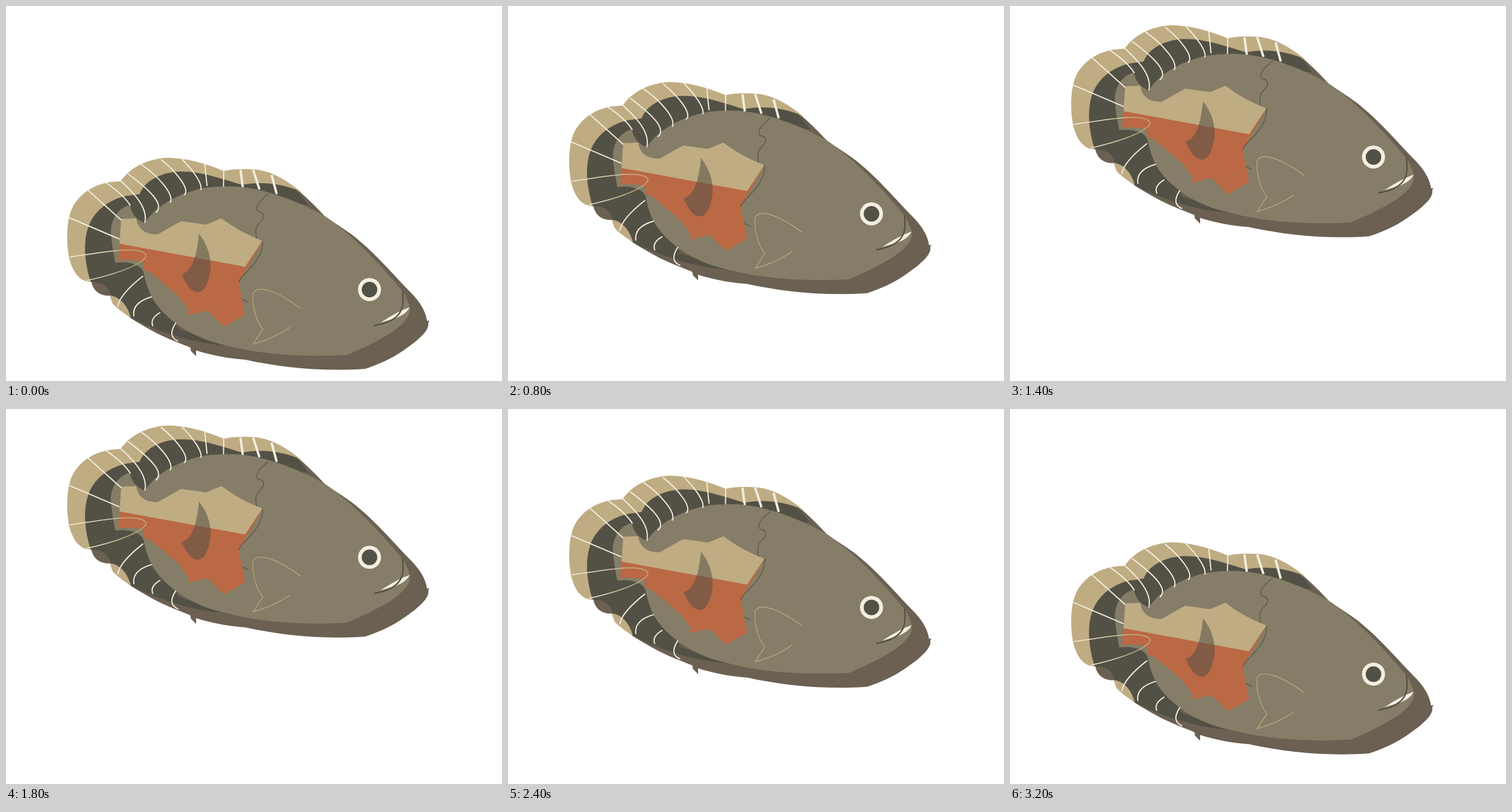
Animation, 861 px wide and 650 px high, one loop 3400 ms. Source, as an HTML page with a canvas:

```html
<!DOCTYPE html>
<html lang="en">
<head>
<meta charset="utf-8">
<title>Fish</title>
<style>
  html, body { margin: 0; width: 100%; height: 100%; overflow: hidden; background: #fff; }
  canvas { display: block; }
</style>
</head>
<body>
<canvas id="stage" width="861" height="650"></canvas>
<script>
const ctx = document.getElementById('stage').getContext('2d');

const BROWN = '#6b6052', TAN = '#bfac82', DARK = '#535145';
const OLIVE = '#857d67', RUST = '#bb6844', CREAM = '#f3eee0';
const LOOP = 3400, STEP = 200;

// Tail ray loop fades from cream to tan as it crosses the body
const rayFade = ctx.createLinearGradient(110, 0, 244, 0);
rayFade.addColorStop(0, CREAM);
rayFade.addColorStop(0.45, '#e6dabb');
rayFade.addColorStop(0.75, TAN);

const layers = [];
const fill = (color, d, alpha = 1) => layers.push({ path: new Path2D(d), color, alpha });
const line = (color, width, d) => layers.push({ path: new Path2D(d), color, width, alpha: 1 });

function disc(color, x, y, r) {
  const path = new Path2D();
  path.arc(x, y, r, 0, Math.PI * 2);
  layers.push({ path, color, alpha: 1 });
}

// Underside and back shadow
fill(BROWN, `M480 300 C510 318 535 345 553 364 C570 376 586 386 600 396
  C640 427 665 458 700 494 C718 512 728 527 731 546 L735 545 L733 549
  C736 562 715 580 690 597 C670 611 645 622 623 629 C550 634 480 627 415 613
  C385 611 355 605 330 597 L330 607 L321 598 L320 592 L290 580
  C265 570 240 556 215 540 L180 502 C160 503 150 490 148 477 L200 420 L300 400Z`);

// Fins
fill(TAN, `M199 304 C155 304 128 325 115 350 C103 375 105 420 111 442
  C118 465 130 479 149 478 L250 400 L480 320 L512 322
  C485 300 455 283 425 283 C405 282 390 283 378 286
  C345 272 310 263 280 263 C245 265 215 280 199 304Z`);
fill(TAN, 'M180 502 C200 500 214 520 217 541 C205 533 190 522 185 516Z');
fill(DARK, `M147 478 C135 440 134 405 144 380 C155 353 180 335 210 329 L232 326
  C240 305 265 289 300 287 C340 286 375 300 410 310 C440 304 475 307 505 319
  L525 345 L412 330 L250 400 L239 465 L300 560 L382 588
  C320 585 260 562 217 541 C212 522 200 505 182 502 C178 488 168 478 153 479Z`);

// Body
fill(OLIVE, `M241 376 C258 350 290 328 340 316 C365 312 390 312 412 314
  C465 321 515 343 553 364 C600 396 645 442 688 494 C697 507 701 520 701 529
  C697 555 650 580 592 605 C515 609 440 604 382 588 C325 577 275 543 253 505
  C246 490 242 478 239 462 C235 449 215 442 190 445 C186 428 182 400 182 388
  C184 366 196 350 215 345 C218 362 228 371 241 376Z`);

// Side patch
fill(RUST, `M197 412 L195 441 L213 440 Q230 440 240 446 L238 457 L250 461 L300 503
  L318 528 L314 536 L350 528 L378 556 L415 535 L404 479 L445 408 L445 406 L400 430Z`);
fill(TAN, `M200 369 L226 368 Q230 396 263 396 L304 373 L347 379 L374 368
  Q405 392 445 407 L415 452 L197 412Z`);
fill(DARK, `M335 395 C349 412 357 435 355 457 C352 478 345 496 333 496
  C320 495 312 481 305 465 C326 459 332 425 335 395Z`, 0.55);

// Fin rays
for (const d of [
  'M142 319 L200 371',
  'M173 306 Q204 327 216 346',
  'M110 367 L197 404',
  'M198 302 C223 325 247 350 241 376',
  'M212 291 C247 317 277 344 260 358',
  'M234 274 C263 294 293 326 285 341',
  'M269 266 C295 287 321 318 309 328',
  'M305 265 C324 284 342 308 338 319',
  'M345 274 L349 312',
  'M378 286 L377.5 313',
  'M238 468 Q197 500 194 521',
  'M253 504 Q218 514 222 538',
  'M268 531 Q249 542 255 555',
  'M295 549 Q279 573 299 581'
]) line(CREAM, 2, d);
for (const d of ['M407 284 L411 314', 'M429 284 L440 318', 'M461 293 L470 326']) line(CREAM, 4, d);
line(rayFade, 1.6, 'M111 435 C160 428 204 420 228 424 C244 427 247 433 238 440 C220 455 180 467 140 476');

// Gill lines
line(DARK, 1.2, `M456 325 C441 336 430 350 438 356 C451 358 449 368 441 375
  C432 383 433 393 435 403`);
line(DARK, 1.2, 'M445 407 C448 431 427 452 414 465 Q407 471 404 479');
line(DARK, 1.2, 'M410 508 L420 513');
line(TAN, 1.2, `M511 524 C475 497 437 481 429 498 C426 521 436 549 446 560
  L429 586 Q466 576 493 557`);

// Mouth and eye
fill(CREAM, 'M650 549 Q678 530 701 522 Q695 534 677 541 Z');
line(DARK, 2.4, 'M688 494 C693 525 686 546 639 554');
disc(CREAM, 631, 491.5, 20);
disc(DARK, 631, 491.5, 13.5);

// Rises for nine poses, then sinks a little more slowly
function lift(time) {
  const pose = Math.floor((time % LOOP) / STEP);
  return pose < 9 ? -32.83 * pose : -234.4 + 28.93 * (pose - 9);
}

function draw(time) {
  ctx.setTransform(1, 0, 0, 1, 0, 0);
  ctx.fillStyle = '#fff';
  ctx.fillRect(0, 0, 861, 650);
  ctx.translate(0, lift(time));
  for (const { path, color, width, alpha } of layers) {
    ctx.globalAlpha = alpha;
    if (width) {
      ctx.strokeStyle = color;
      ctx.lineWidth = width;
      ctx.stroke(path);
    } else {
      ctx.fillStyle = color;
      ctx.fill(path);
    }
  }
  ctx.globalAlpha = 1;
}

let start;
function tick(now) {
  start ??= now;
  draw(now - start);
  requestAnimationFrame(tick);
}
draw(0);
requestAnimationFrame(tick);
</script>
</body>
</html>
```
